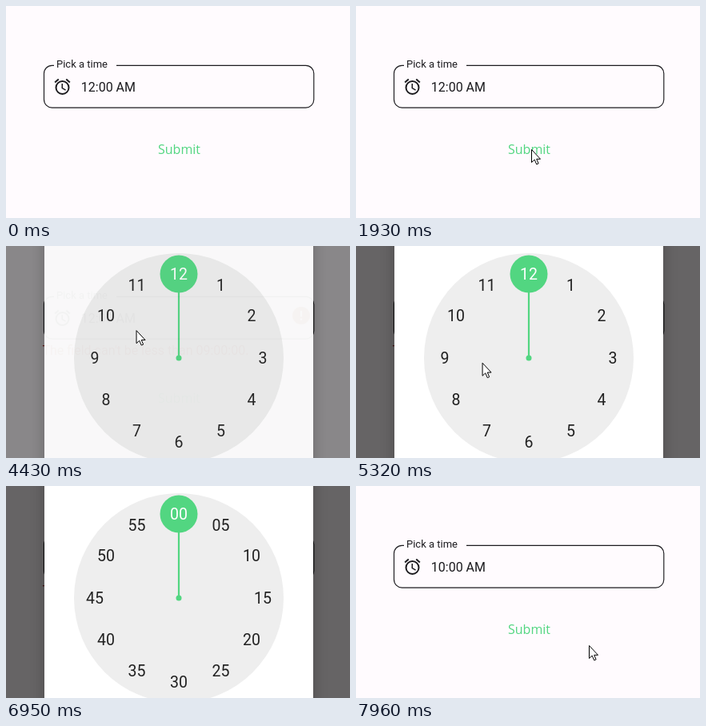
Write an HTML page with a canvas that moves like this. It is 430 px wide and 265 px high and loops after 8000 ms.

```html
<!DOCTYPE html>
<html lang="en">
<head>
<meta charset="utf-8">
<title>Time picker</title>
<style>
  html, body { margin: 0; width: 100%; height: 100%; overflow: hidden; background: #fffbfe; }
  canvas { display: block; width: 430px; height: 265px; }
</style>
</head>
<body>
<canvas id="stage"></canvas>
<script>
const W = 430, H = 265, LOOP = 8000, TAU = Math.PI * 2;
const GREEN = '#52d681', INK = '#1c1b1f', RED = '#b3261e';
const SANS = 'Roboto, sans-serif';
const CX = 216, CY = 140, FACE = 131, RING = 105, KNOB = 23.5;
const ERROR_AT = 2000, OPEN_AT = 4360, PICK_AT = 6000, RELEASE_AT = 6400, ACCEPT_AT = 7420, CLOSED_AT = 7550;
const scale = window.devicePixelRatio || 1;

const ARROW = new Path2D('M0 0V16L3.7 12.6L6.2 18.4L8.6 17.4L6.2 11.8H11Z');
const ALARM = new Path2D('M20 13A8 8 0 1 1 4 13A8 8 0 1 1 20 13M2.65 6.5L7.25 2.6M21.35 6.5L16.75 2.6');
const ALARM_HANDS = new Path2D('M11.75 8V13.6L16.1 16.2');

function setup(canvas) {
  canvas.width = W * scale;
  canvas.height = H * scale;
  const g = canvas.getContext('2d');
  g.scale(scale, scale);
  return g;
}
const stage = setup(document.getElementById('stage'));
const layer = document.createElement('canvas');
const dialog = setup(layer);

// where the pointer rests, when it arrives and when it leaves
const stops = [
  { x: 244, y: 267, from: 0, to: 640 },
  { x: 219, y: 179, from: 1390, to: 3340 },
  { x: 118, y: 92, from: 3890, to: 4300 },
  { x: 206, y: 118, from: 4560, to: 4560 },
  { x: 165, y: 162, from: 5120, to: 5120 },
  { x: 128, y: 81, from: 5800, to: 5800 },
  { x: 135, y: 87, from: PICK_AT, to: RELEASE_AT },
  { x: 340, y: 285, from: 6800, to: 7780 },
  { x: 291, y: 199, from: 7960, to: LOOP }
];
const presses = [[1660, 1860], [3960, 4100], [PICK_AT, RELEASE_AT]];

const clamp = v => Math.min(1, Math.max(0, v));
const ease = p => (1 - Math.cos(Math.PI * clamp(p))) / 2;
const within = (t, a, b) => t >= a && t < b;

function pointerAt(t) {
  const i = stops.findIndex(s => s.to > t);
  const b = stops[i], a = stops[i - 1] || b;
  const p = t >= b.from ? 1 : ease((t - a.to) / (b.from - a.to));
  return [a.x + (b.x - a.x) * p, a.y + (b.y - a.y) * p];
}

function disc(g, x, y, r, color) {
  g.fillStyle = color;
  g.beginPath();
  g.arc(x, y, r, 0, TAU);
  g.fill();
}

function stroke(g, path, width, color) {
  g.strokeStyle = color;
  g.lineWidth = width;
  g.stroke(path);
}

function text(g, str, x, y, size, color, family = SANS, align = 'left') {
  g.font = `${size}px ${family}`;
  g.textAlign = align;
  g.fillStyle = color;
  g.fillText(str, x, y);
}

function drawOutline(g, l, top, r, bottom, c) {
  const p = new Path2D();
  p.moveTo(138, top);
  p.arcTo(r, top, r, bottom, c);
  p.arcTo(r, bottom, l, bottom, c);
  p.arcTo(l, bottom, l, top, c);
  p.arcTo(l, top, r, top, c);
  p.lineTo(60, top);
  stroke(g, p, 1.15, INK);
}

function drawAlarm(g, x, y) {
  g.save();
  g.translate(x, y);
  stroke(g, ALARM, 2, INK);
  stroke(g, ALARM_HANDS, 1.5, INK);
  g.restore();
}

function drawForm(g, time, invalid) {
  const d = invalid ? -11 : 0;
  g.fillStyle = '#fffbfe';
  g.fillRect(0, 0, W, H);
  drawOutline(g, 47.5, 74.3 + d, 384.8, 127.1 + d, 10);
  text(g, 'Pick a time', 63, 77 + d, 13, INK);
  drawAlarm(g, 58.5, 89 + d);
  text(g, time, 93.8, 107 + d, 16, INK);
  text(g, 'Submit', 190, 185 - d, 16, GREEN, '"Open Sans", sans-serif');

  if (invalid) {
    text(g, "The field can't be less than 09:00:00.", 45.5, 136, 16, RED);
    disc(g, 369, 87, 11, RED);
    g.fillStyle = '#fff';
    g.fillRect(367.9, 81, 2.2, 7.5);
    g.fillRect(367.9, 90.4, 2.2, 2.3);
  }
}

const polar = deg => [CX + RING * Math.sin(deg * TAU / 360), CY - RING * Math.cos(deg * TAU / 360)];

function numbers(g, color, mix) {
  for (let i = 0; i < 12; i++) {
    const [x, y] = polar(i * 30);
    const put = (str, alpha) => {
      g.globalAlpha = alpha;
      text(g, str, x, y + 6.8, 19.5, color, SANS, 'center');
    };
    put(String(i || 12), 1 - mix);
    put(String(i * 5).padStart(2, '0'), mix);
  }
  g.globalAlpha = 1;
}

function drawDialog(g, t) {
  const mix = ease((t - RELEASE_AT) / 540);
  const [x, y] = polar(t < PICK_AT ? 0 : 300 + 60 * mix);

  g.clearRect(0, 0, W, H);
  g.save();
  g.shadowColor = 'rgba(0,0,0,.25)';
  g.shadowBlur = 16 * scale;
  g.fillStyle = '#fff';
  g.fillRect(48, -40, 336, H + 80);
  g.restore();

  disc(g, CX, CY, FACE, '#eee');
  numbers(g, '#212121', mix);
  stroke(g, new Path2D(`M${CX} ${CY}L${x} ${y}`), 2.2, GREEN);
  disc(g, CX, CY, 3.5, GREEN);
  disc(g, x, y, KNOB, GREEN);

  // numbers under the selector turn white
  g.save();
  g.beginPath();
  g.arc(x, y, KNOB, 0, TAU);
  g.clip();
  numbers(g, '#fff', mix);
  g.restore();
}

function drawPointer(g, x, y) {
  g.save();
  g.translate(x + .5, y + .5);
  g.fillStyle = '#fff';
  g.fill(ARROW);
  stroke(g, ARROW, 1, '#000');
  g.restore();
}

function draw(t) {
  const g = stage, accepted = t >= ACCEPT_AT;
  drawForm(g, accepted ? '10:00 AM' : '12:00 AM', within(t, ERROR_AT, ACCEPT_AT));

  if (within(t, OPEN_AT, CLOSED_AT)) {
    const shown = accepted ? clamp((CLOSED_AT - 20 - t) / 150) : clamp((t - OPEN_AT + 60) / 170);
    g.fillStyle = `rgba(0,0,0,${.6 * shown})`;
    g.fillRect(0, 0, W, H);
    drawDialog(dialog, t);
    g.globalAlpha = 1 - (1 - shown) ** 2;
    g.drawImage(layer, 0, 0, W, H);
    g.globalAlpha = 1;
  }

  const [x, y] = pointerAt(t);
  if (presses.some(p => within(t, ...p))) disc(g, x, y, 12, 'rgba(255,255,0,.5)');
  drawPointer(g, x, y);
}

const start = performance.now();
function tick() {
  draw((performance.now() - start) % LOOP);
  requestAnimationFrame(tick);
}
tick();
</script>
</body>
</html>
```
